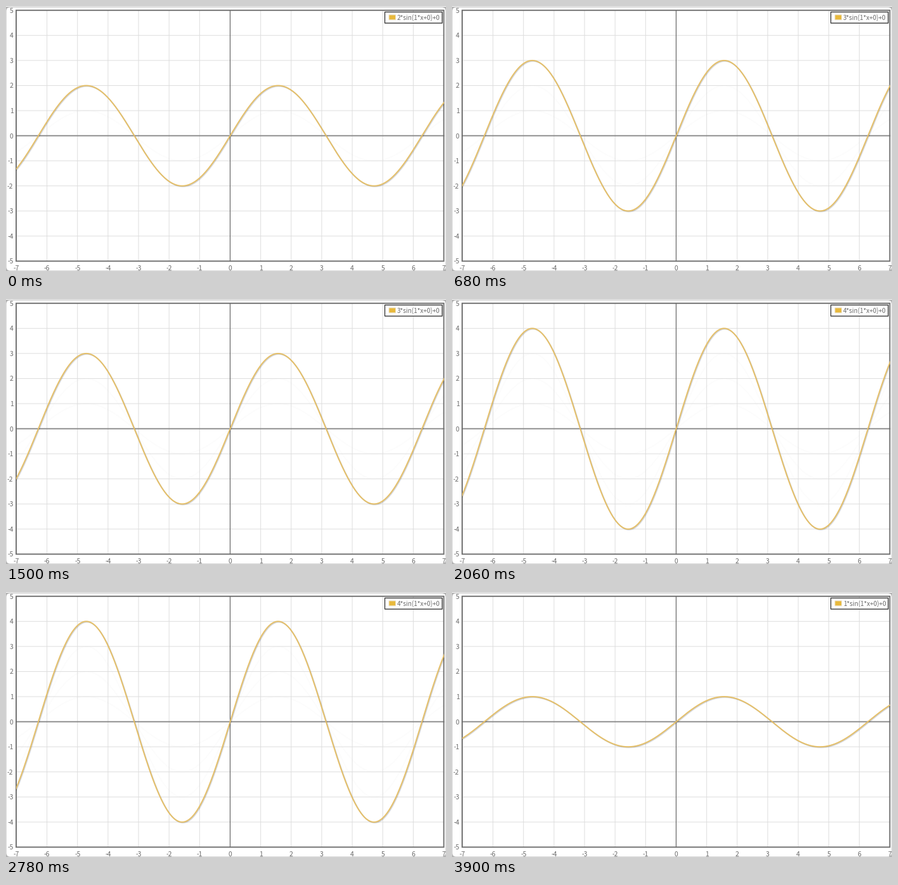
A matplotlib script for the animation above (4.64 s loop, 694x418 px).

```python
import numpy as np
import matplotlib.pyplot as plt
from matplotlib.animation import FuncAnimation
from matplotlib.patches import FancyBboxPatch, Rectangle

W, H, DPI = 694, 418, 64
PT = 72 / DPI                 # points per pixel
LOOP, STEP = 4640, 20         # ms
STAGES = [(0, 2), (680, 3), (1780, 4), (3500, 1)]   # start in ms, amplitude

X0, Y0 = 353.5, 204.6         # origin in pixels
UX, UY = 48.15, 39.57         # pixels per unit

GOLD = "#e6c068"
INK = "#6c6c6c"
GRID = "#dedede"

plt.rcParams["font.family"] = "Noto Sans CJK JP"
fig = plt.figure(figsize=(W / DPI, H / DPI), dpi=DPI, facecolor="#b4b4b4")
ax = fig.add_axes([0, 0, 1, 1])
ax.set_xlim(0, W)
ax.set_ylim(H, 0)
ax.axis("off")


def sx(x):
    return X0 + UX * x


def sy(y):
    return Y0 - UY * y


LEFT, RIGHT, TOP, BOTTOM = sx(-7) - 0.4, sx(7), sy(5), sy(-5)


def line(xs, ys, color, width, z, **kw):
    return ax.plot(xs, ys, color=color, lw=width * PT, zorder=z,
                   snap=False, **kw)[0]


def box(x, y, w, h, fill, edge, width, z):
    ax.add_patch(Rectangle((x, y), w, h, fc=fill, ec=edge, lw=width * PT,
                           zorder=z, snap=False))


def label(x, y, s, size=10.4, ha="center"):
    return ax.text(x, y, s, fontsize=size * PT, color=INK, ha=ha,
                   va="baseline", zorder=9)


# white panel with rounded corners
ax.add_patch(FancyBboxPatch((0.5, 2), W - 1, H - 2.5, fc="white", ec="none",
                            boxstyle="round,pad=0,rounding_size=6", zorder=0))
box(0, 0, W, 1, "white", "none", 0, 0)

# grid, axes and tick labels
for k in range(-6, 7):
    line([sx(k)] * 2, [TOP, BOTTOM], GRID, 1, 1)
for k in range(-4, 5):
    line([LEFT, RIGHT], [sy(k)] * 2, GRID, 1, 1)
line([X0, X0], [TOP, BOTTOM], "#666666", 1.2, 2)
line([LEFT, RIGHT], [Y0, Y0], "#868686", 1.8, 2)
for k in range(-7, 8):
    label(sx(k), 416.6, str(k))
for k in range(-5, 6):
    label(11.5, sy(k) + 4, str(k), ha="right")
box(LEFT, TOP, RIGHT - LEFT, BOTTOM - TOP, "none", "#6e6e6e", 1.9, 3)

# curve with a soft shadow, and faint traces of lower amplitudes
area = Rectangle((LEFT, TOP), RIGHT - LEFT + 0.5, BOTTOM - TOP,
                 transform=ax.transData)
x = np.linspace(-7.02, 7.02, 500)
px, wave = sx(x), np.sin(x)
shadows = [line(px, sy(wave), "black", 1.8, 4, alpha=0.08) for _ in range(3)]
curve = line(px, sy(wave), GOLD, 1.9, 5)
traces = [line(px, sy(a * wave), "#fcfcfc", 1.5, 0.5) for a in (1, 2, 3)]
for part in shadows + [curve] + traces:
    part.set_clip_path(area)

# legend
box(597.5, 9.5, 90.5, 17.5, "white", "#3a3a3a", 1.4, 7)
box(604, 14, 10.5, 7.8, "#e8b93c", "#eadfc2", 1, 8)
formula = label(617, 21.8, "", size=10, ha="left")


def draw(i):
    t = i * STEP
    amp = [a for start, a in STAGES if start <= t][-1]
    y = sy(amp * wave)
    curve.set_ydata(y)
    for n, part in enumerate(shadows, 1):
        part.set_data(px + 0.45 * n, y + 0.45 * n)
    for a, part in enumerate(traces, 1):
        part.set_visible(a < amp)
    formula.set_text(f"{amp}*sin(1*x+0)+0")
    return [*traces, *shadows, curve, formula]


anim = FuncAnimation(fig, draw, frames=LOOP // STEP, interval=STEP,
                     repeat=True, repeat_delay=0)
plt.show()
```
